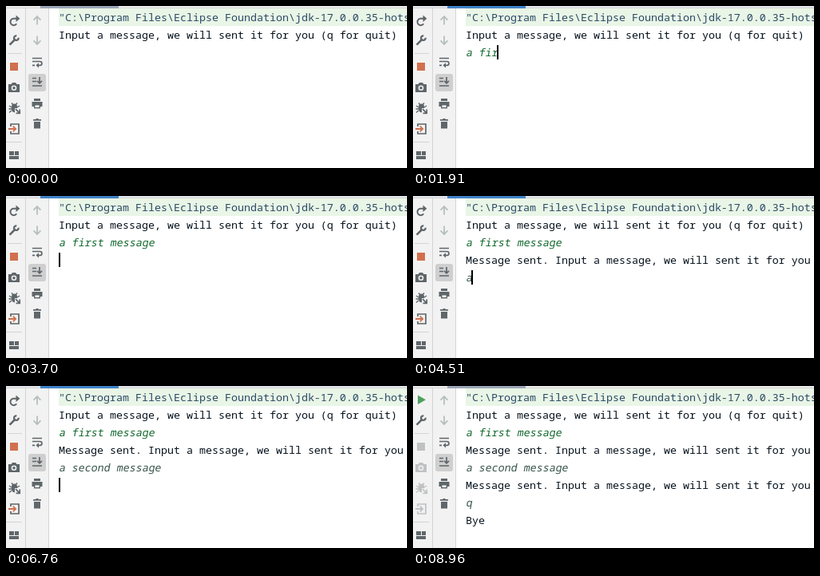
Recreate the animation shown at these times as an HTML page. Size 502 px wide and 203 px high, loop 9.03 s.

```html
<!DOCTYPE html>
<html lang="en">
<head>
<meta charset="utf-8">
<title>Console session</title>
<style>
  html, body { margin: 0; width: 100%; height: 100%; overflow: hidden; background: #fff; }
  svg { display: block; }
  text { font: 500 13.333px "Noto Sans Mono", "DejaVu Sans Mono", monospace; white-space: pre; fill: #06121c; }
  .command { fill: #2b4a66; }
  .typed { fill: #14692f; }
  .dim { fill: #38544a; }
  .line { fill: none; stroke: #5f666a; stroke-width: 1.7; }
  .solid { fill: #5f666a; }
  .faint { fill: none; stroke: #b5bfbd; stroke-width: 1.8; }
  .red { fill: #d0704f; }
  .redLine { fill: none; stroke: #d0704f; stroke-width: 1.8; }
  .hole { fill: #f2f2f2; }
  .ended .live .solid, .ended .live .red { fill: #bfc1c2; }
  .ended .live .line, .ended .live .redLine { stroke: #bfc1c2; }
  .ended .rerun, .play { display: none; }
  .ended .play { display: inline; fill: #4f9f60; }
  #header { fill: #ececec; }
  #tab { fill: #9ca7b8; }
  .focused #header { fill: #e2e6ec; }
  .focused #tab { fill: #4083c9; }
</style>
</head>
<body>
<svg id="stage" width="502" height="203">
  <rect width="502" height="203" fill="#fff"/>
  <rect y="3" width="54" height="200" fill="#f2f2f2"/>
  <path d="M24.5 3V203M53.5 3V203M2 59.5H20M0 170.5H20" stroke="#d4d4d4"/>
  <rect id="header" width="502" height="3"/>
  <rect y="2" width="502" height="1" fill="#d4d4d4"/>
  <rect id="tab" x="43" width="98" height="3"/>
  <rect x="66" y="3" width="436" height="22" fill="#e9f5e6"/>
  <rect x="28" y="85" width="22" height="22" rx="3" fill="#cfcfcf"/>

  <!-- run toolbar -->
  <g transform="translate(2 10)">
    <g class="rerun">
      <path class="line" style="stroke-width:2" d="M11.2 12.2A4.2 4.2 0 1 1 7 5.8H11"/>
      <path class="solid" d="M10.5 1.6L15.4 5.8L10.5 10Z"/>
    </g>
    <path class="play" d="M4 1.5L14 7.2L4 13Z"/>
  </g>
  <g transform="translate(2 35)">
    <path class="line" style="stroke-width:2.6" d="M2.6 13.6L8.8 7.4"/>
    <path class="line" style="stroke-width:2.3" d="M11.3 2.4A2.8 2.8 0 1 0 13.6 4.7"/>
  </g>
  <g class="live">
    <rect class="red" x="5" y="71" width="10" height="10"/>
    <g transform="translate(2 94)">
      <path class="solid" d="M1 4H4.5L6 2H10L11.5 4H15V14H1Z"/>
      <circle class="hole" cx="8" cy="8.7" r="3.3"/>
      <circle class="solid" cx="8" cy="8.7" r="1.8"/>
    </g>
    <g transform="translate(3 120)">
      <path class="line" style="stroke-width:1.4" d="M4 1.5L6 4M11 1.5L9 4M1 5L4 7M14 5L11 7M.5 9H4M1 13.5L4 11"/>
      <path class="solid" d="M4 6A3.5 3.5 0 0 1 11 6V8H8V13.5Q4 13 4 9Z"/>
      <path class="line" d="M9 9.2L14 14.2M14.2 9.5V14.4H9.5"/>
    </g>
    <g transform="translate(2 146)">
      <path class="line" d="M4 5V2H14V14H4V11"/>
      <path class="redLine" d="M1 8H10M6.8 4.6L10.2 8L6.8 11.4"/>
    </g>
  </g>
  <path class="solid" d="M4 182H10V187H4ZM11 182H16V187H11ZM4 188H16V192H4Z"/>

  <!-- console toolbar -->
  <g transform="translate(31 10)"><path class="faint" d="M8 13.5V3M3.6 7.6L8 3L12.4 7.6"/></g>
  <g transform="translate(31 35)"><path class="faint" d="M8 2.5V13M3.6 8.4L8 13L12.4 8.4"/></g>
  <g transform="translate(31 62)">
    <path class="line" d="M2 3.5H14M2 7.5H11.5A2.4 2.4 0 0 1 11.5 12.3H9M2 12.3H5"/>
    <path class="solid" d="M10 9.2V15.4L6.4 12.3Z"/>
  </g>
  <g transform="translate(31 87)">
    <path class="line" d="M2 3.5H7M2 7.5H7M2 13H14M11 2V9.5M8 6.8L11 9.8L14 6.8"/>
  </g>
  <g transform="translate(31 114)">
    <path class="solid" d="M4 2H12V5H4ZM1.5 6H14.5V12H12V9H4V12H1.5Z"/>
    <rect class="line" x="4.7" y="9.7" width="6.6" height="4" style="stroke-width:1.4"/>
  </g>
  <g transform="translate(31 139)">
    <path class="solid" d="M3 3H6L7 2H9L10 3H13V4.7H3ZM4 6H12V14.5H4Z"/>
  </g>

  <g id="console"></g>
  <rect id="caret" width="2" height="18" fill="#000"/>
</svg>
<script>
const LOOP = 9030, LEFT = 66, CELL = 8, ROW = 22, SLANT = -10;
const stage = document.getElementById('stage');
const consoleText = document.getElementById('console');
const caret = document.getElementById('caret');
const prompt = 'Input a message, we will sent it for you (q for quit)';

const output = [
  { row: 0, at: 0, text: '"C:\\Program Files\\Eclipse Foundation\\jdk-17.0.0.35-hotspot', style: 'command' },
  { row: 1, at: 0, text: prompt },
  { row: 3, at: 3900, text: 'Message sent. ' + prompt },
  { row: 5, at: 6960, text: 'Message sent. ' + prompt },
  { row: 7, at: 7900, text: 'Bye' }
];

// One key time per character.
const inputs = [
  { row: 2, text: 'a first message', style: 'typed', keys: [1450, 1650, 1780, 1780, 1910, 2110, 2240, 2370,
    2640, 2710, 2910, 2980, 3110, 3110, 3240] },
  { row: 4, text: 'a second message', style: 'typed dim', keys: [4510, 4710, 4840, 4970, 5100, 5170, 5300, 5430, 5560,
    5690, 5760, 5960, 6030, 6160, 6290, 6360] },
  { row: 6, text: 'q', style: 'typed dim', keys: [7620] }
];

const caretRows = [[660, 2], [3700, 3], [3900, 4], [6760, 5], [6960, 6], [7900, 8]];
const caretOn = [[660, 1120], [1450, 8630]];
const focusOn = [[730, 8960]];
const ENDED = 8430;

const within = (spans, t) => spans.some(([from, to]) => t >= from && t < to);

function addLine(row, style = '', slant = 0) {
  const node = document.createElementNS(stage.namespaceURI, 'text');
  node.setAttribute('transform', `translate(${LEFT} ${19 + ROW * row}) skewX(${slant})`);
  node.setAttribute('class', style);
  return consoleText.appendChild(node);
}

function setText(node, text) {
  if (node.textContent !== text) node.textContent = text;
}

for (const line of output) line.node = addLine(line.row, line.style);
for (const line of inputs) line.node = addLine(line.row, line.style, SLANT);

function render(t) {
  const [, row] = caretRows.filter(([at]) => t >= at).pop() || caretRows[0];
  let column = 0;
  for (const line of output) setText(line.node, t >= line.at ? line.text : '');
  for (const line of inputs) {
    const count = line.keys.filter(at => t >= at).length;
    setText(line.node, line.text.slice(0, count));
    if (line.row === row) column = count;
  }
  caret.setAttribute('x', Math.max(LEFT, LEFT - 1 + CELL * column));
  caret.setAttribute('y', 5 + ROW * row);
  caret.style.visibility = within(caretOn, t) ? 'visible' : 'hidden';
  stage.classList.toggle('focused', within(focusOn, t));
  stage.classList.toggle('ended', t >= ENDED);
}

const start = performance.now();
function tick() {
  render((performance.now() - start) % LOOP);
  requestAnimationFrame(tick);
}
tick();
</script>
</body>
</html>
```
